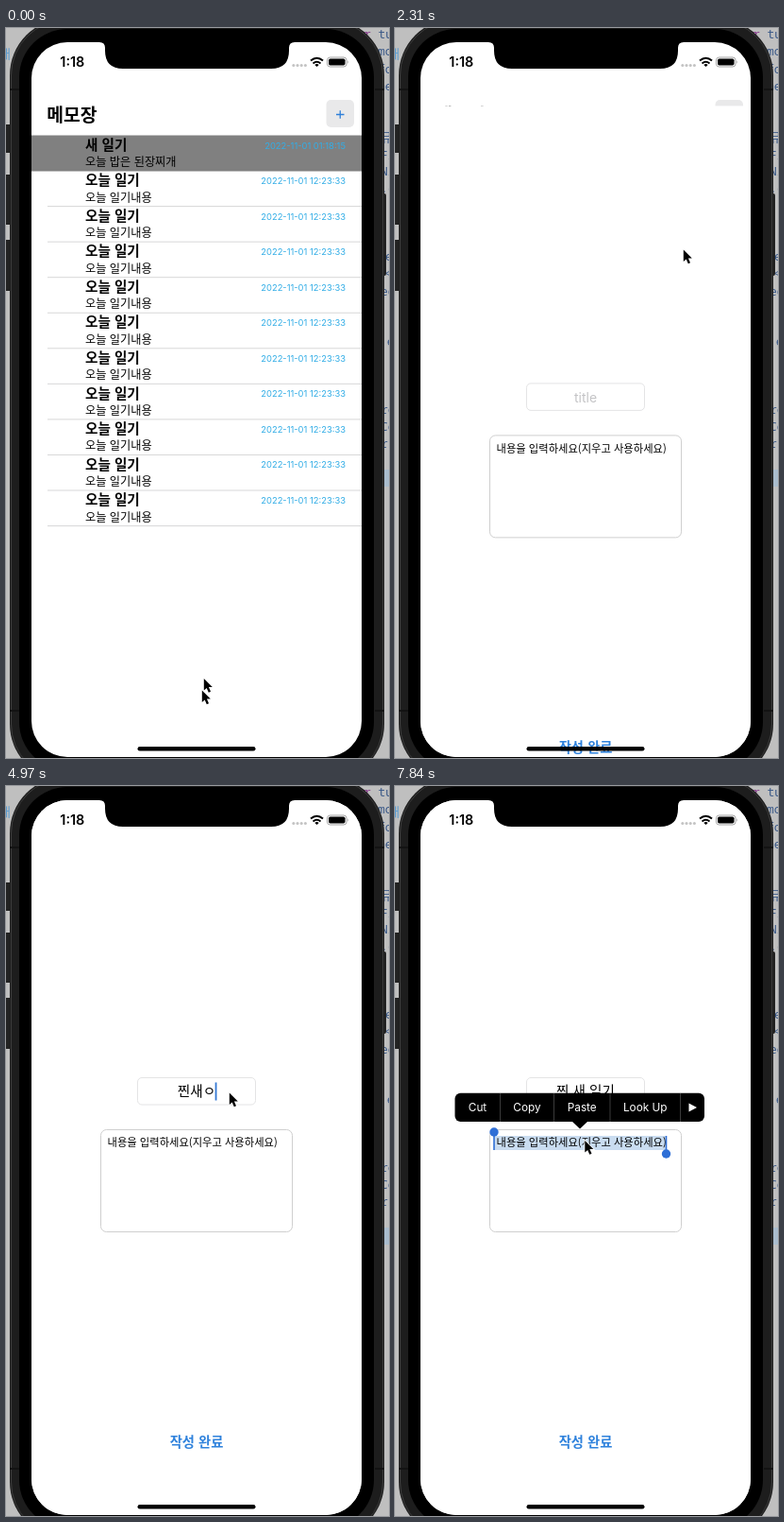
Write an HTML page that moves like this. It is 406 px wide and 772 px high and loops after 8000 ms.

```html
<!DOCTYPE html>
<html lang="ko">
<head>
<meta charset="utf-8">
<style>
html, body { margin: 0; width: 100%; height: 100%; overflow: hidden; background: #bfbfbf; }
svg { display: block; }
text { font-family: Inter, "Noto Sans CJK KR", "Noto Sans CJK", sans-serif; white-space: pre; }
.ko { font-family: "Noto Sans CJK KR", "Noto Sans CJK", sans-serif; }
.b { font-weight: 700; }
.mid { text-anchor: middle; }
.code text { font: 13px "Noto Sans Mono", "Noto Sans CJK KR", monospace; }
.date { font-size: 9.4px; fill: #32ade6; text-anchor: end; }
.menu text { font-size: 11.8px; fill: #fff; text-anchor: middle; }
</style>
</head>
<body>
<svg width="406" height="772" viewBox="0 0 406 772">
  <defs>
    <clipPath id="screen"><rect x="27" y="15" width="350" height="756" rx="38"/></clipPath>
    <path id="arrow" d="M.8 1V13.600L3.700 10.900 5.800 15.800 8 14.800 5.900 10.100H9.800Z" stroke="#fff" stroke-width="1.600" paint-order="stroke"/>
  </defs>

  <g id="code" class="code" fill="#3c5a88">
    <rect x="400" y="467" width="6" height="18" fill="#a9bccd"/>
    <text x="-7" y="32" fill="#5a9bd0">배</text>
  </g>

  <g fill="#222">
    <rect x="-3" y="102" width="9" height="30" rx="2"/>
    <rect x="-3" y="155" width="9" height="53" rx="2"/>
    <rect x="-3" y="224" width="9" height="54" rx="2"/>
    <rect x="396" y="175" width="7" height="87" rx="2"/>
  </g>
  <rect x="4" y="-10" width="397" height="806" rx="60" fill="#1d1d1d"/>
  <rect x="5.500" y="-8.500" width="394" height="803" rx="58.500" fill="none" stroke="#3b3b3b"/>
  <path d="M4 65H14M391 65H401M4 722H14M391 722H401" stroke="#131313" stroke-width="2"/>
  <rect x="14" y="1" width="376" height="784" rx="51"/>

  <g clip-path="url(#screen)">
    <rect x="27" y="15" width="350" height="757" fill="#fff"/>
    <g id="list">
      <text class="ko b" x="43.300" y="99" font-size="19.300">메모장</text>
      <rect id="add" x="339.500" y="76" width="29.500" height="29" rx="5" fill="#e9e9ea"/>
      <path id="plus" d="M350 91.500H358.500M354.250 87.200V95.800" stroke="#2f7fd8" stroke-width="1.300"/>
      <rect x="27" y="113.500" width="350" height="38" fill="#808080"/>
    </g>
    <g id="modal">
      <rect x="27" y="15" width="350" height="757" fill="#fff"/>
      <rect x="139.500" y="308.500" width="125" height="28.500" rx="4.500" fill="#fff" stroke="#e4e4e5"/>
      <text id="hint" class="mid" x="202" y="328.500" font-size="14" fill="#c4c4c6">title</text>
      <text id="title" class="ko mid" x="202" y="328" font-size="14.600"></text>
      <rect id="caret" y="313.500" width="1.800" height="19" fill="#3478d4"/>
      <rect x="100.500" y="363.500" width="203" height="108" rx="6" fill="#fff" stroke="#cfcfcf"/>
      <rect id="mark" y="370" height="15" fill="#c9dcf0"/>
      <text class="ko" x="107.500" y="381.300" font-size="11.300">내용을 입력하세요(지우고 사용하세요)</text>
      <g id="grips" fill="#2f6fd6">
        <g id="gripA"><rect x="-.8" y="368" width="1.600" height="17"/><circle cy="366" r="4.700"/></g>
        <g id="gripB"><rect x="-.8" y="370" width="1.600" height="17"/><circle cy="389" r="4.700"/></g>
      </g>
      <text class="ko b mid" x="202" y="698.500" font-size="14.300" fill="#2f82dc">작성 완료</text>
      <g id="wordMenu" class="menu"></g>
      <g id="allMenu" class="menu"></g>
    </g>
    <path d="M99 14V15Q105 15 105 21V24Q105 43 124 43H281Q300 43 300 24V21Q300 15 306 15V14Z"/>
    <text x="57.300" y="41" font-size="14.400" font-weight="600">1:18</text>
    <g fill="#c3c3c3">
      <circle cx="304.800" cy="39.500" r="1.500"/><circle cx="309" cy="39.500" r="1.500"/>
      <circle cx="313.200" cy="39.500" r="1.500"/><circle cx="317.400" cy="39.500" r="1.500"/>
    </g>
    <g fill="none" stroke="#000" stroke-width="2">
      <path d="M323 34.600Q329.500 28.800 336 34.600M325.500 37.400Q329.500 34 333.500 37.400"/>
      <path d="M327.300 38.900Q329.500 37.300 331.700 38.900L329.500 41Z" fill="#000" stroke="none"/>
    </g>
    <rect x="340.500" y="31" width="20.500" height="10" rx="3" fill="none" stroke="#a5a5a5"/>
    <rect x="342" y="32.500" width="17.500" height="7" rx="1.700"/>
    <path d="M362.300 34.300Q364 36 362.300 37.700Z" fill="#a5a5a5"/>
    <rect x="139.500" y="760" width="125" height="4.600" rx="2.300"/>
  </g>

  <circle id="ring" r="20" fill="none" stroke="#000" stroke-width="2.800"/>
  <use id="ghost" href="#arrow" x="207" y="699.500"/>
  <use id="pointer" href="#arrow"/>
</svg>
<script>
const $ = id => document.getElementById(id);
const add = (id, html) => $(id).insertAdjacentHTML('beforeend', html);
const set = (id, attrs) => { for (const k in attrs) $(id).setAttribute(k, attrs[k]); };
const show = (id, alpha) => set(id, { opacity: +alpha });
const within = (t, a, b) => t >= a && t < b;

// Editor text peeking out behind the phone
[[394, 24, 'mo'], [394, 43, 'fo'], [394, 61, 'me'], [397, 115, '뮤'], [397, 134, 'Fi'],
 [397, 151, 'Ni'], [397, 169, '.c'], [402, 241, 'e'], [401, 259, '<'], [397, 278, 'ed'],
 [396, 331, ' e'], [397, 403, 're'], [397, 421, 'Co'], [397, 439, 'rF']]
  .forEach(([x, y, s]) => add('code', `<text x="${x}" y="${y + 4.5}">${s}</text>`));
add('code', '<text x="379" y="10.500" fill="#8a3f8f">r</text><text x="394.500" y="10.500">tu</text>');

const pitch = 37.55;
for (let i = 0; i < 11; i++) {
  const y = 113.5 + i * pitch;
  add('list', `<text class="ko b" x="84" y="${y + 15.2}" font-size="14.600">${i ? '오늘' : '새'} 일기</text>
    <text class="ko" x="84" y="${y + 32.5}" font-size="12.200">${i ? '오늘 일기내용' : '오늘 밥은 된장찌개'}</text>
    <text class="date" x="360" y="${y + 14}">2022-11-01 ${i ? '12:23:33' : '01:18:15'}</text>`);
  if (i) add('list', `<path d="M44 ${y + pitch}H377" stroke="#c6c6c8" stroke-width=".7"/>`);
}

// edges: left side, dividers, right side
function buildMenu(id, edges, labels, tip) {
  const left = edges[0], right = edges[edges.length - 1];
  add(id, `<rect x="${left}" y="324.800" width="${right - left}" height="30.200" rx="6"/>
    <path d="M${tip - 8} 355h16l-8 7.500Z"/>`);
  labels.forEach((s, i) => add(id, `<text x="${(edges[i] + edges[i + 1]) / 2}" y="344.200">${s}</text>
    <path d="M${edges[i + 1]} 325V355" stroke="#4a4a4a" stroke-width=".8"/>`));
  add(id, `<path d="M${right - 16.5} 335.500l8.500 4.500-8.500 4.500Z" fill="#fff"/>`);
}
buildMenu('wordMenu', [35.5, 84.5, 141.5, 201.5, 284.5, 310], ['Cut', 'Copy', 'Paste', 'Replace…'], 167.5);
buildMenu('allMenu', [63.5, 111.5, 168.5, 228, 302.5, 328], ['Cut', 'Copy', 'Paste', 'Look Up'], 196);

const path = [[0, 209, 687], [70, 215, 672], [210, 253, 560], [350, 230, 390], [490, 150, 220],
  [630, 66, 122], [700, 60, 103], [770, 66, 120], [840, 84, 143], [910, 106, 148], [1050, 190, 126],
  [1260, 289, 89], [1330, 289, 89], [1470, 322, 87], [1680, 350, 92], [2100, 350, 92], [2310, 305, 233.5],
  [2520, 256, 304], [2730, 236, 323.5], [6580, 236, 323.5], [6720, 214, 352], [6860, 194, 375],
  [7770, 194, 375], [7840, 200.5, 374]];

function pointerAt(t) {
  const i = path.findIndex(p => p[0] >= t);
  if (i < 1) return path[i < 0 ? path.length - 1 : 0].slice(1);
  const [a, b] = [path[i - 1], path[i]], k = (t - a[0]) / (b[0] - a[0]);
  return [1, 2].map(n => a[n] + (b[n] - a[n]) * k);
}

const typing = [[0, ''], [3990, 'ㅉ'], [4270, '찌'], [4410, '찐'], [4690, '찐ㅅㅐ'], [4970, '찐새ㅇ'],
  [5110, '찐'], [5250, '찐 ㅅ'], [5460, '찐 새'], [5600, '찐 새 '], [5740, '찐 새 ㅇ'], [5880, '찐 새 일'],
  [6090, '찐 새 일기']];
const clicks = [[1960, 2170], [2800, 3080], [7000, 7070], [7140, 7210], [7280, 7420]];

function draw(t) {
  const [x, y] = pointerAt(t);
  set('pointer', { x, y });
  set('ring', { cx: x + .4, cy: y + .9 });
  show('ring', clicks.some(c => within(t, ...c)));
  show('ghost', t < 70);

  const pressed = within(t, 1960, 2170);
  show('add', pressed ? .8 : 1);
  show('plus', pressed ? .6 : 1);

  // Critically damped spring for the sheet
  const w = Math.max(0, t - 2089) * .01826;
  set('modal', { transform: `translate(0 ${757 * (1 + w) * Math.exp(-w)})` });

  const text = typing.filter(s => s[0] <= t).pop()[1];
  $('title').textContent = text;
  show('hint', !text);
  set('caret', { x: text ? 202 + $('title').getComputedTextLength() / 2 - .5 : 187.3 });
  const blink = within(t, 3710, 3990) ? Math.max(0, .55 - (t - 3710) / 255) : 1;
  show('caret', within(t, 2870, 7000) ? blink : 0);

  const all = t >= 7420;
  const [from, to] = all ? [105, 287.5] : [141.5, 194];
  set('mark', { x: from, width: to - from });
  set('gripA', { transform: `translate(${from} 0)` });
  set('gripB', { transform: `translate(${to} 0)` });
  show('mark', t >= 7280);
  show('grips', t < 7350 ? 0 : all ? 1 : .55);
  show('wordMenu', within(t, 7350, 7420) ? .19 : 0);
  show('allMenu', all ? Math.min(1, (t - 7350) / 210) : 0);
}

const start = performance.now();
function tick() {
  const t = (performance.now() - start) % 8000;
  draw(Math.min(112, Math.floor(t / 70)) * 70);
  requestAnimationFrame(tick);
}
tick();
</script>
</body>
</html>
```
